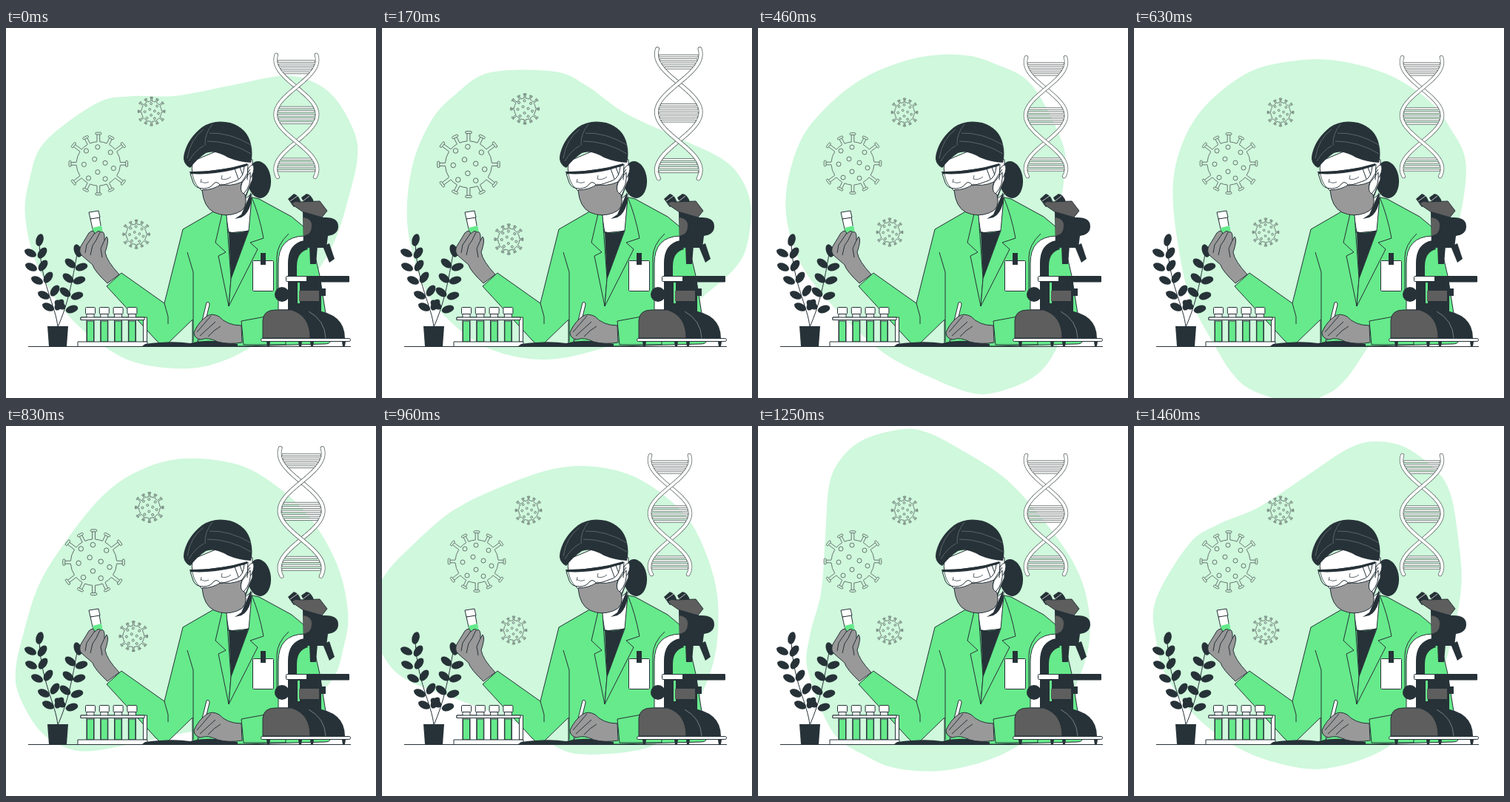
Write an HTML page with a canvas that moves like this. It is 500x500 px and loops after 1.5 s.

```html
<!DOCTYPE html>
<html>
<head>
<meta charset="utf-8">
<style>
html, body { margin: 0; width: 100%; height: 100%; overflow: hidden; background: #fff; }
canvas { display: block; width: 500px; height: 500px; }
</style>
</head>
<body>
<canvas id="stage" width="500" height="500"></canvas>
<script>
const canvas = document.getElementById('stage');
const ctx = canvas.getContext('2d');
const LOOP = 1500, STEPS = 36, TAU = Math.PI * 2;
const DARK = '#263238', GREEN = '#66ea8b', PALE = '#cff8dc';
const GLOVE = '#999', METAL = '#5e5e5e', THIN = '#5d6866';

function shape(d, fill, stroke, width = 1) {
  const path = new Path2D(d);
  if (fill) { ctx.fillStyle = fill; ctx.fill(path); }
  if (stroke) { ctx.strokeStyle = stroke; ctx.lineWidth = width; ctx.stroke(path); }
}
const line = (d, color = DARK, width = 1) => shape(d, null, color, width);

function rect(x, y, w, h, fill, stroke, r = 0) {
  ctx.beginPath();
  ctx.roundRect(x, y, w, h, r);
  if (fill) { ctx.fillStyle = fill; ctx.fill(); }
  if (stroke) { ctx.strokeStyle = stroke; ctx.lineWidth = 1; ctx.stroke(); }
}

function oval(x, y, rx, ry, angle, fill, stroke, width = 1) {
  ctx.beginPath();
  ctx.ellipse(x, y, rx, ry, angle, 0, TAU);
  if (fill) { ctx.fillStyle = fill; ctx.fill(); }
  if (stroke) { ctx.strokeStyle = stroke; ctx.lineWidth = width; ctx.stroke(); }
}

// Outline points around the pivot, joined by a closed Catmull-Rom curve.
const blobPoints = [
  [136, -205], [97, -205], [30, -181], [-40, -156], [-100, -146], [-144, -129],
  [-205, -66], [-217, -12], [-215, 36], [-190, 97], [-142, 155], [-83, 193],
  [-30, 209], [40, 204], [95, 178], [138, 136], [178, 66], [203, 5],
  [213, -60], [216, -112], [206, -146], [173, -187]
];

function drawBlob(phase) {
  const n = blobPoints.length, at = i => blobPoints[(i + n) % n];
  ctx.save();
  ctx.translate(244, 252);
  ctx.rotate(phase * TAU);
  ctx.beginPath();
  ctx.moveTo(...at(0));
  for (let i = 0; i < n; i++) {
    const [a, b, c, d] = [at(i - 1), at(i), at(i + 1), at(i + 2)];
    ctx.bezierCurveTo(
      b[0] + (c[0] - a[0]) / 6, b[1] + (c[1] - a[1]) / 6,
      c[0] - (d[0] - b[0]) / 6, c[1] - (d[1] - b[1]) / 6, c[0], c[1]);
  }
  ctx.fillStyle = PALE;
  ctx.fill();
  ctx.restore();
}

const virusDots = [[-1, -22], [-16, -17], [16, -15], [-5, -6], [-19, 1],
  [9, -1], [20, 6], [-1, 11], [-13, 19], [9, 20]];
// Angle in degrees and stem end of the spikes on one half.
const spikes = [[0, 36], [37, 39.5], [64, 37], [90, 38.5], [116, 37], [143, 39.5]];

function drawVirus(x, y, size) {
  const width = 0.9 / size ** 0.9, body = 29, half = 0.065;
  const all = [...spikes, ...spikes.map(([deg, tip]) => [deg + 180, tip])]
    .map(([deg, tip]) => [deg * TAU / 360, tip]);
  ctx.save();
  ctx.translate(x, y);
  ctx.scale(size, size);
  ctx.strokeStyle = THIN;
  ctx.lineWidth = width;
  ctx.beginPath();
  all.forEach(([angle, tip], i) => {
    const next = i < 11 ? all[i + 1][0] : TAU;
    ctx.moveTo(body * Math.cos(angle + half), body * Math.sin(angle + half));
    ctx.arc(0, 0, body, angle + half, next - half);
    ctx.save();
    ctx.rotate(angle);
    for (const side of [-1.8, 1.8]) {
      ctx.moveTo(body, side);
      ctx.lineTo(tip, side);
    }
    ctx.roundRect(tip, -4, 2.8, 8, 1.4);
    ctx.restore();
  });
  ctx.stroke();
  for (const [dx, dy] of virusDots) oval(dx, dy, 3, 3, 0, null, THIN, width);
  ctx.restore();
}

function drawHelix() {
  const spread = y => 27.5 * Math.sin(Math.PI * (y - 82) / 72);
  ctx.lineWidth = 0.8;
  ctx.fillStyle = '#fff';
  ctx.strokeStyle = THIN;
  for (const [first, last] of [[48, 67], [109, 131], [177, 194]]) {
    for (let y = first; y <= last; y += 5) {
      const w = Math.max(12, Math.abs(spread(y)) - 3);
      ctx.beginPath();
      ctx.rect(389 - w, y - 1.3, 2 * w, 2.6);
      ctx.fill();
      ctx.stroke();
    }
  }
  ctx.lineCap = 'round';
  for (const side of [1, -1]) {
    ctx.beginPath();
    for (let y = 39.5; y <= 200.5; y += 1) ctx.lineTo(389 + side * spread(y), y);
    ctx.strokeStyle = THIN;
    ctx.lineWidth = 5.4;
    ctx.stroke();
    ctx.strokeStyle = '#fff';
    ctx.lineWidth = 3.9;
    ctx.stroke();
  }
  ctx.lineCap = 'butt';
}

const beats = [[0, 1], [0.1, 1.1], [0.3, 1], [0.4, 1], [0.5, 1.1], [0.6, 1], [1, 1]];
function beat(phase) {
  const i = beats.findIndex(([at]) => at > phase);
  const [t0, s0] = beats[i - 1], [t1, s1] = beats[i];
  return s0 + (s1 - s0) * (phase - t0) / (t1 - t0);
}

function drawFloating(phase) {
  const s = beat(phase);
  ctx.save();
  ctx.translate(254.5, 167);
  ctx.scale(s, s);
  ctx.translate(-254.5, -167);
  drawVirus(128, 183, 1);
  drawVirus(198, 114, 0.46);
  drawVirus(178, 276, 0.46);
  drawHelix();
  ctx.restore();
}

function drawPlant() {
  line('M70 404C67 375 47 345 45 290M70 404C84 372 89 345 97 300');
  const leaf = (x, y, a, r = 8.5) => oval(x, y, r, 5, a, DARK);
  leaf(45.5, 286.5, -1.3);
  for (const [x, y] of [[33, 304], [34, 323], [42, 341], [51, 361], [57, 377]]) leaf(x, y, 0.45);
  for (const [x, y] of [[49, 304], [50, 321], [57, 337], [66, 355], [72, 374]]) leaf(x, y, -0.95);
  leaf(97, 301, -1.9, 9);
  for (const [x, y] of [[87, 318], [84, 338], [80, 357], [73, 374]]) leaf(x, y, 0.65);
  for (const [x, y] of [[102, 323], [99, 341], [96, 362], [89, 380]]) leaf(x, y, -0.3);
  shape('M56 403H84L82 430H58Z', DARK);
}

function drawRack() {
  shape('M101 391H190.5V424H185.5V394.5H101Z', '#fff', DARK);
  for (let i = 0; i < 4; i++) {
    const x = 107 + i * 18.8;
    rect(x + 2, 386, 10, 38, '#fff', DARK);
    rect(x + 2.5, 396, 9, 28, GREEN, DARK);
    rect(x + 0.5, 377.5, 13, 9, '#fff', DARK, 1);
  }
  rect(101, 391, 86, 3.5, '#fff', DARK);
  rect(97, 424, 94, 6.5, '#fff', DARK);
}

function drawCoat() {
  shape('M136 349L156 331L214 372L239 272L284 246L333 229L342 231L386 255L410 275L424 335L438 424Q437 427 430 427L320 430H252V394L220 425Q211 431 203 422Z', GREEN, DARK);
  line('M245 303L253 330V424M214 372L219 390V400');
  line('M382 278Q366 293 366 310V365');
  // Neck, shirt and lapels
  shape('M297 251L332 224L330 274L301 277Z', '#fff', DARK);
  shape('M301 275Q315 279 328 273L304 341Z', DARK);
  shape('M318 252L331 222L331 237Q327 252 318 256L309 258Z', DARK);
  shape('M292 251L283 290L297 303L287 308L301 376L304 339L298 253Z', GREEN, DARK);
  shape('M332 229Q342 252 348 284L330 290L340 299L301 376L304 339L328 274Z', GREEN, DARK);
  shape('M318 396L378 385V428L321 428Z', GREEN, DARK);
  rect(333.5, 314.5, 28, 41, '#fff', DARK, 1);
  rect(344, 304, 7, 16, DARK);
}

function drawHead() {
  oval(342, 205, 16, 25, -0.1, DARK);
  shape('M252 180Q249 200 258 213L267 222Q272 245 293 250L318 240L333 205V178L300 160Z', '#fff', DARK);
  shape('M327 190Q335 180 335 190Q334 201 326 206Z', '#fff', DARK);
  // Mask
  line('M318 209L330 191M318 244L332 207');
  shape('M265 219Q280 219 291 211Q302 215 319 208Q314 220 323 225Q328 245 312 250Q296 256 281 249Q267 242 265 219Z', GLOVE, DARK);
  shape('M319 209L330 195Q332 213 321 224Q315 220 319 209Z', '#fff', DARK);
  // Hair
  shape('M249 189Q237 183 241 169Q246 149 265 134Q281 123 303 128Q326 135 331 157Q334 171 331 182Q314 181 300 175Q282 164 270 169Q258 177 249 189Z', DARK);
  line('M279 130Q268 143 269 159M275 142Q302 141 331 158M272 153Q303 153 331 170M267 137Q249 150 245 176M267 159Q255 166 247 180', '#66716f', 0.8);
  // Closed eyes and goggles
  line('M263 207Q268 211 274 208M264 204L263 209M291 204Q298 206 304 201M292 199L291 204');
  shape('M249 197L322 187Q321 202 312 206Q299 211 290 213Q285 206 281 210Q276 217 267 217Q256 217 253 209Z', 'rgba(255,255,255,.25)', DARK);
  line('M309 190L314 204M316 188L320 199M322 187L327 184L326 205');
  shape('M248 194Q286 195 326 183V186L306 192Q276 199 249 197Z', DARK);
}

function drawRaisedHand() {
  shape('M114 258L126 255L130 278L119 280Z', '#fff', DARK);
  shape('M117 270L129 267L132 282L120 285Z', GREEN);
  shape('M112 249L125 247L127 256L114 258Z', '#fff', DARK);
  shape('M137 345Q119 328 117 320L102 307Q98 302 101 295L112 277Q118 271 120 278Q126 272 128 276Q134 273 133 287L136 282Q140 286 134 303Q136 315 153 333Z', GLOVE, DARK);
  line('M120 277L109 293L107 304M127 276Q122 288 117 294L114 307M133 287L128 298L130 310');
}

function drawDesk() {
  line('M30 430.5H466');
  shape('M184 430L188 427Q224 422 249 426Q275 419 313 427V431H186Z', DARK);
  shape('M271 371Q275 369 275 374L264 418L259 424L260 416Z', '#fff', DARK);
  shape('M254 411Q261 396 272 389Q279 385 288 390Q299 402 318 402L319 425Q301 428 286 424Q272 417 264 421Q254 420 254 411Z', GLOVE, DARK);
  line('M277 389L258 411M283 397L262 416M290 403Q281 408 273 417');
}

function drawMicroscope() {
  shape('M403 281Q368 282 368 318V381H382V320Q382 295 403 295Z', '#fff', DARK);
  shape('M403 287Q381 291 381 318V382H393V322Q393 303 408 299Z', DARK);
  oval(373, 360, 10, 10, 0, DARK);
  // Eyepieces and head
  shape('M381 231L389 224Q395 225 399 236L389 242Z', DARK);
  shape('M399 229L406 224Q413 225 416 235L405 241Z', DARK);
  line('M384 234L394 227M401 234L410 227', '#fff', 0.7);
  shape('M386 238Q389 233 397 235L424 234L434 247L426 257L402 249Z', METAL, DARK);
  shape('M401 248L429 256Q449 255 449 268Q449 279 435 281L433 297H402Z', DARK);
  shape('M402 256Q414 258 413 268Q413 279 402 281Z', METAL);
  shape('M410 294H421L419 319H411Z', DARK);
  shape('M428 295L437 291L444 312L437 317Z', DARK);
  // Stage and condenser
  rect(393, 343, 33, 42, DARK);
  rect(394, 344, 3, 28, GREEN);
  rect(396, 355, 27, 14, METAL);
  rect(426, 352, 6, 10, DARK);
  rect(378.5, 335.5, 29, 7, '#fff', DARK, 1);
  rect(406, 335, 58, 8.5, DARK, null, 1);
  // Foot
  shape('M382 381H416Q458 386 458 419H382Z', DARK);
  shape('M347 419V395Q348 381 364 381H386Q411 389 411 419Z', METAL, DARK);
  line('M409 383Q431 395 432 419', '#8c9492', 0.8);
  rect(344.5, 419.5, 121, 4, '#fff', DARK, 2);
  for (const x of [352, 395, 411, 454]) shape(`M${x} 424h5l-1 6h-3Z`, DARK);
}

function drawScene() {
  drawPlant();
  drawCoat();
  drawRack();
  drawHead();
  drawRaisedHand();
  drawDesk();
  drawMicroscope();
}

// Motion advances in 24 steps a second, a little faster late in the loop.
function phaseAt(t) {
  const step = Math.floor((t + 5) * STEPS / LOOP) % STEPS;
  return (step + 1 + Math.max(0, step - 20) / 6) / 40;
}

function render(now) {
  const phase = phaseAt(now % LOOP);
  ctx.fillStyle = '#fff';
  ctx.fillRect(0, 0, 500, 500);
  ctx.lineJoin = 'round';
  drawBlob(phase);
  drawFloating(phase);
  drawScene();
}

let start = null;
function tick(now) {
  if (start === null) start = now;
  render(now - start);
  requestAnimationFrame(tick);
}
render(0);
requestAnimationFrame(tick);
</script>
</body>
</html>
```
